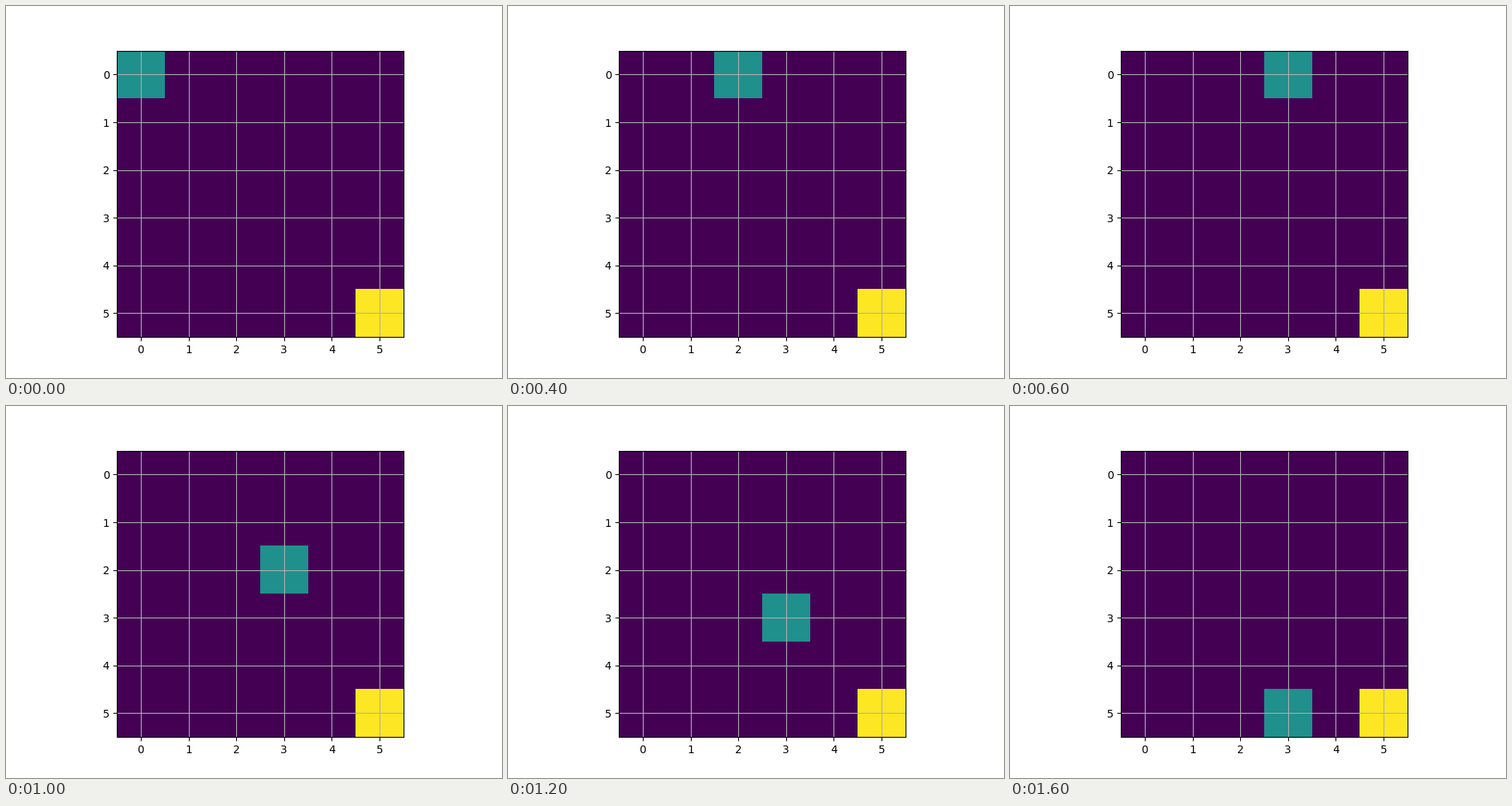
Recreate the animation shown at these times as a matplotlib script. Size 640 by 480 pixels, loop 10000 ms.

```python
import matplotlib.pyplot as plt
import numpy as np
from matplotlib.animation import FuncAnimation

SIZE = 6
TURN = 3          # column where the agent stops going right and heads down
STEP_MS = 200
LOOP_MS = 10000
AGENT, GOAL = 1, 2


def agent_cell(step):
    """Row and column after a number of moves: right first, then down."""
    col = min(step, TURN)
    row = min(max(step - TURN, 0), SIZE - 1)
    return row, col


def grid_state(step):
    grid = np.zeros((SIZE, SIZE))
    grid[-1, -1] = GOAL
    grid[agent_cell(step)] = AGENT
    return grid


fig, ax = plt.subplots(figsize=(6.4, 4.8), dpi=100)
image = ax.imshow(grid_state(0), cmap="viridis", vmin=0, vmax=GOAL)
ax.set_xticks(range(SIZE))
ax.set_yticks(range(SIZE))
ax.grid(True)


def update(step):
    image.set_data(grid_state(step))
    return (image,)


anim = FuncAnimation(fig, update, frames=LOOP_MS // STEP_MS,
                     interval=STEP_MS, repeat=True, repeat_delay=0)
plt.show()
```
